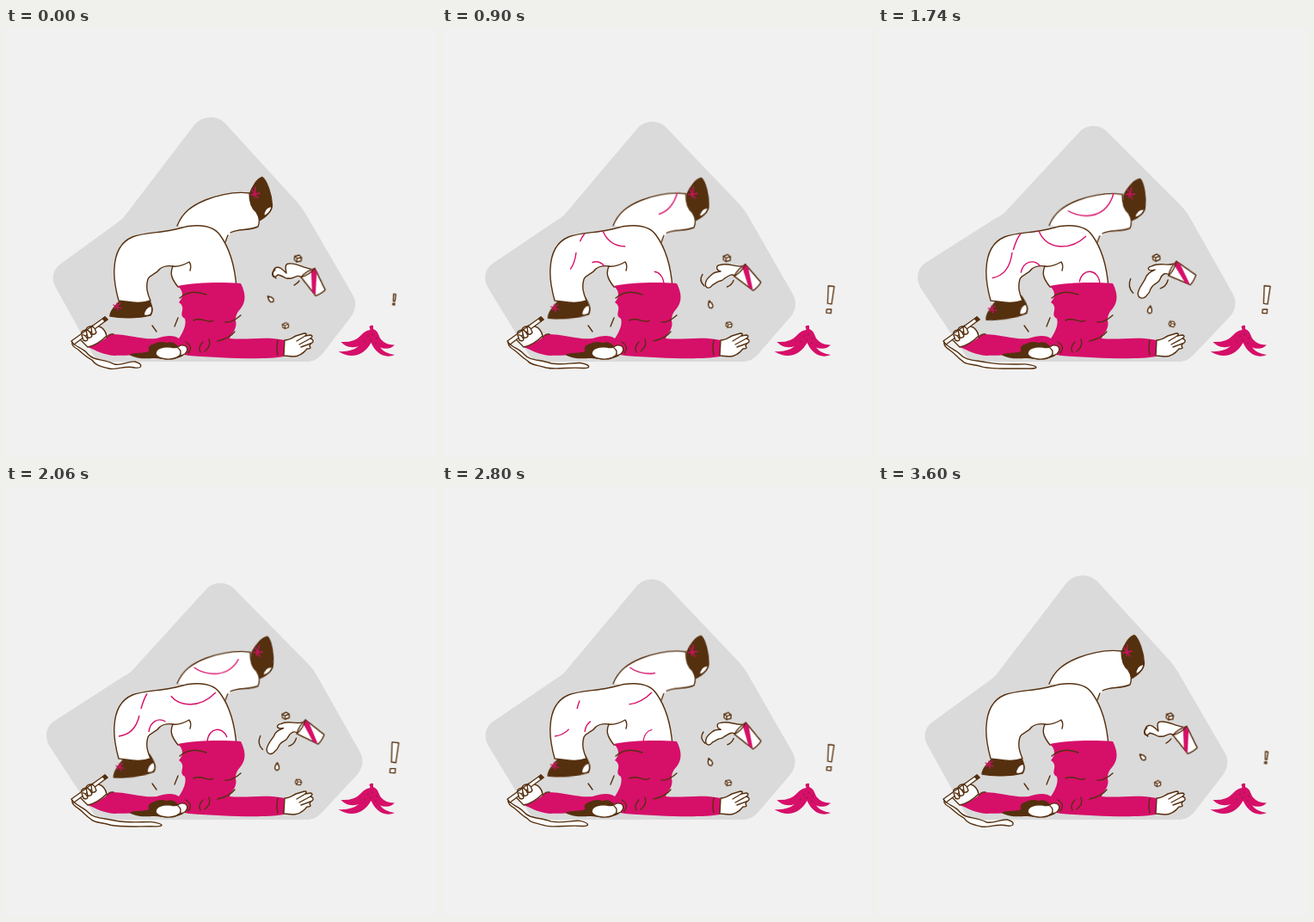
These frames come from a looping animation (500 px wide and 500 px high, 3620 ms). An HTML page without scripts:

```html
<!DOCTYPE html>
<html lang="en">
<head>
<meta charset="utf-8">
<title>Slip</title>
<style>
  html, body { margin: 0; width: 100%; height: 100%; overflow: hidden; background: #f1f1f1; }
  svg { display: block; width: 100vw; height: 100vh; }

  .ink { fill: none; stroke: #56300f; stroke-width: 1.4; stroke-linecap: round; stroke-linejoin: round; }
  .white { fill: #fff; }
  .brown { fill: #54300f; }
  .pink { fill: #d60f69; stroke: none; }
  .lace { fill: none; stroke: #d60f69; stroke-width: 1.3; stroke-linecap: round; }
  .thin { stroke-width: .8; }

  /* Everything sways there and back; the seams are drawn, then erased. */
  .sway { animation: 1.81s linear infinite alternate; }
  .morph { animation-name: morph; }
  .move { animation-name: move; transform: var(--a); }
  .pulse { animation-name: pulse; }
  .pulse path { vector-effect: non-scaling-stroke; }
  .seam { fill: none; stroke: #d60f69; stroke-width: 1.4; stroke-dasharray: 100 110; animation: trace 3.62s linear infinite; }

  @keyframes morph { to { d: var(--to); } }
  @keyframes move { from { transform: var(--a); } to { transform: var(--b); } }
  @keyframes trace { from { stroke-dashoffset: 101; } to { stroke-dashoffset: -101; } }
  @keyframes pulse {
    0% { transform: translate(451.5px, 315.7px) scale(.3); }
    23% { transform: translate(451.5px, 315.7px) scale(1); }
    46% { transform: translate(451.5px, 315.7px) scale(.71); }
    70% { transform: translate(451.5px, 315.7px) scale(1); }
    100% { transform: translate(451.5px, 315.7px) scale(.73); }
  }

  .blob { --to: path("M147 215 L236 120 C243 113 258 112 266 120 L353 207 Q360 214 364 222 L413 309 C418 319 416 328 410 335 L367 380 C361 386 356 388 349 388 L118 388 C110 388 104 385 100 378 L49 302 C43 291 46 278 55 273 L137 221 Q143 218 147 215 Z"); }
  .splash { --to: path("M341 288 C334 283 330 286 328 292 C326 298 322 296 318 302 C315 306 317 308 313 311 C309 317 303 316 302 311 C301 306 306 300 310 293 C312 286 316 284 322 281 C312 284 312 278 318 277 C326 272 336 277 343 274"); }
  .swishL { --to: path("M293 292 Q289 302 296 309"); }
  .swishR { --to: path("M337 293 Q335 301 328 303"); }
  .trail { --to: path("M77 365 C80 371 90 374 95 379 C102 387 112 386 128 389 C144 392 160 391 172 391 C188 393 188 396 178 396 C160 396 135 397 122 394 C110 390 103 392 99 388 C92 383 90 379 84 375 C79 372 76 369 77 365 Z"); }
  .cup { --a: translate(358.5px, 296.5px) rotate(58deg); --b: translate(354.5px, 286px) rotate(28deg); }
  .cubeA { --a: translate(339.5px, 268px) rotate(8deg); --b: translate(323px, 267px) rotate(-8deg); }
  .cubeB { --a: translate(325px, 346px) rotate(-5deg) scale(.85); --b: translate(342.5px, 344px) rotate(30deg) scale(.85); }
  .drop { --a: translate(307.5px, 315px) rotate(-45deg); --b: translate(316.5px, 328px) rotate(10deg); }
  .shoeL { transform-origin: 155px 300px; --a: rotate(0deg); --b: rotate(-8deg); }
  .shoeR { transform-origin: 290px 213px; --a: rotate(0deg); --b: rotate(10.5deg); }
  .farLeg { transform-origin: 225px 235px; --a: rotate(0deg); --b: rotate(1.5deg); }
</style>
</head>
<body>
<svg viewBox="0 0 500 500">
  <defs>
    <g id="cube">
      <path class="white" d="M-4 -2 L1 -4 L4 -1.5 L4 2.5 L-1 4 L-4 2 Z"/>
      <path d="M-4 -2 L-1 0 L4 -1.5 M-1 0 V4"/>
    </g>
  </defs>

  <path class="blob sway morph" fill="#dadada" d="M137 220 L218 114 C227 102 244 100 255 111 L339 203 Q345 210 349 217 L403 310 C408 318 407 328 401 336 L367 380 C361 386 356 388 349 388 L118 388 C110 388 104 385 100 378 L58 302 C52 291 54 281 64 274 L130 226 Q134 223 137 220 Z"/>

  <g class="shoeR sway move">
    <path class="ink brown" d="M298 173.5 C292 175 286 185 283 194 C282 206 288 216 293 225 C302 220 309 214 309.500 206 C309 193 303 177 298 173.500 Z"/>
    <path class="ink white" d="M300 219 Q299 209 309 207 Q309 214 300 219 Z"/>
    <path class="lace" d="M286 188 L293 198 M290 185 L289 197 M285 194 L295 192"/>
  </g>
  <g class="farLeg sway move">
    <path class="white" d="M199 229 C205 215 215 207 232 200 C250 193 268 190 283 192 C283 204 286 210 291 214 C295 220 295 226 293 231 C282 236 270 233 260 240 L255 250 L232 240 Z"/>
    <path class="ink" d="M199 230 C205 215 215 207 232 200 C250 193 268 190 283 192 C283 204 286 210 291 214 C295 220 295 226 293 231 C282 236 270 233 261 238 M258 241 L255 249"/>
    <path class="seam" pathLength="100" d="M273 191 C269 206 260 217 242 218 C232 218 225 216 218 211"/>
  </g>

  <g class="shoeL sway move">
    <path class="ink brown" d="M138 312 C130 320 121 328 121 335 C135 338 155 337 168 334 C171 330 170 322 165 313 Z"/>
    <path class="ink white" d="M169 323 Q161 325 160 334 Q165 335 168 333 Q171 329 169 323 Z"/>
    <path class="lace" d="M125 322 L134 326 M129 320 L130 328 M133 320 L126 326"/>
  </g>
  <path class="ink white" d="M200 301 C191 290 191 284 194 277 C188 276 183 277 179 280 C174 287 168 286 165 292 C162 302 165 310 168 317 C155 322 142 318 131 317 C128 306 125 291 126 279 C127 261 133 249 147 243 C156 239 175 238 187 236 C196 235 204 232 212 230.500 C230 228 242 231 249 241 C260 256 266 275 268 302 Z"/>
  <path class="ink" d="M194 277 C201 278 206 276 213 272 Q216 276 214 282"/>
  <g>
    <path class="seam" pathLength="100" d="M187 236 C192 248 201 254 214 254 C226 254 235 249 244 240"/>
    <path class="seam" pathLength="100" d="M166 239 C161 245 159 252 157 259"/>
    <path class="seam" pathLength="100" d="M156 261 C154 277 147 289 131 291"/>
    <path class="seam" pathLength="100" d="M189 277 C181 268 168 271 166 286"/>
    <path class="seam" pathLength="100" d="M258 298 C257 279 236 278 234 297"/>
  </g>

  <!-- torso and arms -->
  <path class="pink" d="M200 300 C218 296 250 295 273 297 C279 309 279 318 273 326 Q265 334 267.500 343 C268 351 262 355 260 361 C280 363 302 358 324 363 L323 382 C300 386 255 384 213 381 L185 376 C160 382 145 380 126 381 C113 380 105 375 95 371 C106 367 115 363 121 356 C143 356 160 363 175 361 Q193 355 201 361 C207 352 210 344 208 338 C199 333 211 326 201 319 C207 312 206 306 200 300 Z"/>
  <g class="ink">
    <path d="M202 314 Q214 303 233 310 M273 334 Q263 343 255 342 M218 340 C228 335 235 345 241 340 M246 364 Q260 361 266 353 M316 363 Q314 372 316 380 M117 360 Q120 355 125 356"/>
    <path d="M170 346 L175 353 M200 337 L196 347"/>
  </g>

  <!-- head -->
  <path class="ink brown" d="M145 380 C152 377 161 380 167 376 Q164 370 172 368 Q179 364 187 367 Q193 364 199 370 L205 381 C196 386 184 385 172 383 Q155 385 145 380 Z"/>
  <path class="ink white" d="M174 379 C174 372 183 370 192 371 Q198 373 203 369 C211 368 213 374 208 379 C204 382 200 380 199 383 C190 387 177 385 174 379 Z"/>
  <path class="ink" d="M200 372 Q205 376 202 381 M209 365 Q218 370 212 378 M229 365 Q223 371 226 377 M236 362 Q239 370 231 376"/>

  <!-- hands -->
  <path class="ink white" d="M324 363 C330 363 333 360 337 358 L347 355 Q351 355 348 358 L354 357 Q358 358 354 361 L356 362 Q359 365 354 367 L353 370 Q356 373 350 373 C346 378 340 382 334 382 L323 381 Z"/>
  <path class="ink" d="M348 358 L338 364 M354 361 L341 368 M354 367 L343 371"/>
  <path class="trail ink white sway morph" d="M77 365 C80 371 90 372 95 379 C103 388 114 384 126 391 C136 393 141 387 150 388 C160 391 158 396 150 395 C138 392 128 398 120 396 C108 393 104 392 100 386 C92 382 89 378 84 374 C79 371 76 369 77 365 Z"/>
  <path class="ink white" d="M117 358 C112 363 105 369 95 371 L87 363 Q83 360 88 358 Q86 352 93 351 Q94 347 99 347 Q103 344 108 347 Q115 349 117 358 Z"/>
  <path class="ink white" d="M115 336 L118 339 L79 368 L76 364 Z"/>
  <path class="ink brown" d="M115 336 L118 339 L115 341 L112.500 338 Z"/>
  <path class="ink white" d="M88 357 Q92 356 95 362 Q94 365 90 363 Z M93 351 Q97 351 100 358 Q99 361 95 360 Z M99 347 Q103 347 105 354 Q103 357 100 356 Z"/>

  <!-- spilled drink -->
  <path class="splash ink white sway morph" d="M344 290 C338 285 334 293 328 291 C326 292 324 290 322 289 C320 288 318 287 316 287 C311 293 308 287 311 282 C313 277 317 278 319 279 C322 281 324 283 326 285 C325 279 324 274 329 274 C338 273 345 279 354 280"/>
  <path class="swishL ink sway morph" d="M313 281 Q307 286 314 291"/>
  <path class="swishR ink sway morph" d="M341 294 Q339 297 335 299"/>
  <g class="cup ink sway move">
    <path class="white" d="M-14 -9.500 Q-17 0 -14 9.500 L13.500 6.500 Q15 0 13.500 -6.500 Z"/>
    <path class="pink" d="M-14 -9.500 L-9 -9 L13 6.500 L6.500 7.300 L-15 -5 Z"/>
    <path d="M-14 -9.500 Q-11 0 -14 9.500"/>
  </g>
  <g class="ink">
    <use class="cubeA sway move" href="#cube"/>
    <use class="cubeB sway move" href="#cube"/>
    <path class="drop white sway move" d="M0 -4.500 Q5 3 0 4.500 Q-5 3 0 -4.500 Z"/>
  </g>

  <!-- peel -->
  <path class="pink" d="M422.500 347 Q425 345 427 346 L427 350 C433 352 433 358 436 362 Q442 369 452 368.500 Q446 375 435 371.500 Q441 379 452 380 C440 385 430 378 424.500 366 C417 380 402 386 386.500 376 Q402 377 410 370 C401 373 394 370 389.500 365 Q405 366 412 358 Q417 352 423.500 351 Z"/>
  <path class="ink thin" d="M421 358 v1 M426 356 v1 M431 360 v1 M417 364 v1 M424 362 v1 M430 366 v1"/>

  <g class="ink white sway pulse">
    <path d="M-3 -21 L6 -20 L2 7 L-4 6 Z M-5.500 15 L1.500 15 L1 21 L-6 20.500 Z"/>
  </g>
</svg>
</body>
</html>
```
